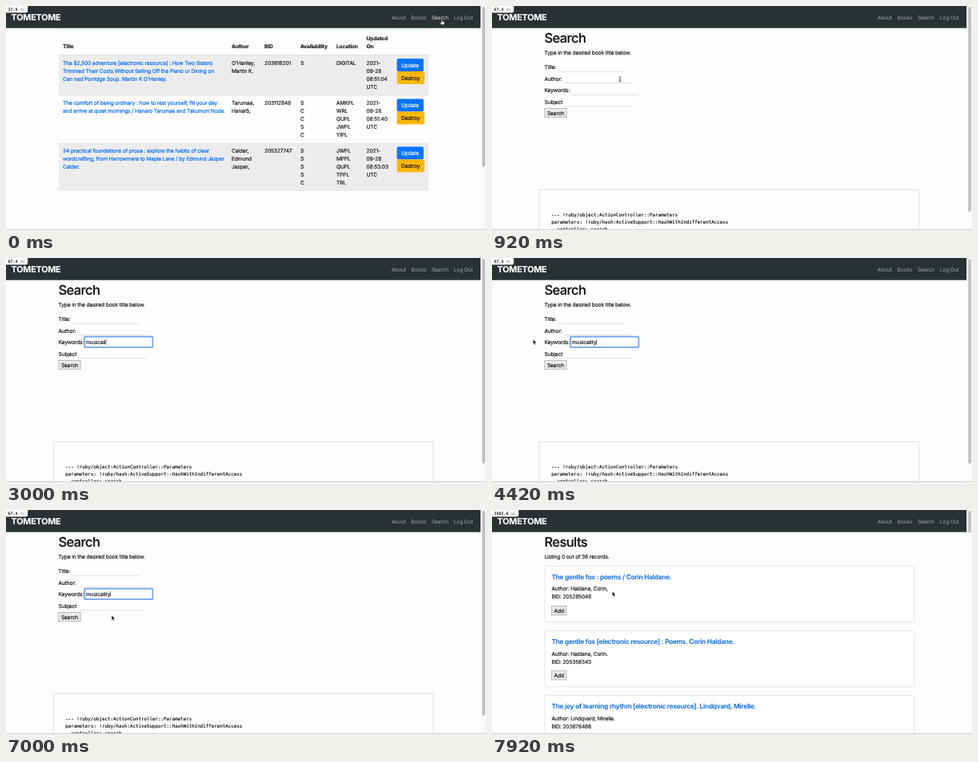
Animation of 600 by 281 pixels, one loop 8000 ms. Source, as an HTML page:

```html
<!DOCTYPE html>
<html lang="en">
<head>
<meta charset="utf-8">
<title>Book search</title>
<style>
  html, body { margin: 0; width: 100%; height: 100%; overflow: hidden; background: #fdfdfd; }
  svg { display: block; width: 100%; height: 100%; }
  text {
    font: 6.66px Inter, "Open Sans", sans-serif;
    letter-spacing: -.021em;
    color: #0c0e10;
    fill: currentColor;
    stroke: currentColor;
    stroke-width: .14px;
    white-space: pre;
    text-rendering: geometricPrecision;
  }
  .brand { font-size: 10.8px; font-weight: 700; letter-spacing: -.02em; color: #fff; }
  .nav { color: #959a9c; stroke-width: .06px; }
  .nav.hover { color: #c8cacb; }
  .h1 { font-size: 16.5px; font-weight: 500; letter-spacing: -.036em; }
  .th { font-weight: 700; letter-spacing: -.027em; stroke-width: .05px; }
  .link { color: #0a70ee; stroke-width: .2px; }
  .title { font-size: 8.32px; font-weight: 600; letter-spacing: -.027em; color: #0a6cdc; stroke-width: .05px; }
  .white { color: #fff; }
  .mono { font: 5.83px "DejaVu Sans Mono", monospace; letter-spacing: 0; }
  .badge { font: 5px "DejaVu Sans Mono", monospace; letter-spacing: 0; color: #888; stroke-width: 0; }
  .badge .num { font-weight: 700; fill: #222; }
</style>
</head>
<body>
<svg id="stage" viewBox="0 0 600 281" preserveAspectRatio="none" xmlns="http://www.w3.org/2000/svg"></svg>
<script>
const LOOP = 8000;
const stage = document.getElementById("stage");

function el(parent, tag, attrs = {}) {
  const node = document.createElementNS("http://www.w3.org/2000/svg", tag);
  for (const key in attrs) node.setAttribute(key, attrs[key]);
  parent.append(node);
  return node;
}
const group = parent => el(parent, "g");
const rect = (parent, x, y, width, height, fill, more = {}) =>
  el(parent, "rect", { x, y, width, height, fill, ...more });
function text(parent, x, y, content, cls = "") {
  const node = el(parent, "text", { x, y, class: cls });
  node.textContent = content;
  return node;
}
const lines = (parent, x, y, list, cls) =>
  list.forEach((line, i) => text(parent, x, y + i * 10, line, cls));
const show = (node, on) => node.setAttribute("display", on ? "inline" : "none");

function button(parent, x, y, w, label) {
  rect(parent, x + .3, y + .3, w - .6, 11.2, "#e9e9e9", { stroke: "#a5a5a5", "stroke-width": .7 });
  text(parent, x + 3.3, y + 8.4, label);
}

rect(stage, 0, 0, 600, 281, "#fdfdfd");

// Book list
function buildBooks() {
  const g = group(stage);
  const cols = [71, 282, 323, 368, 413, 450.5];
  const rows = [
    {
      y: 61.5, h: 50.5, fill: "#ececec",
      cells: [
        ["The $2,500 adventure [electronic resource] : How Two Sisters",
         "Trimmed Their Costs Without Selling Off the Piano or Dining on",
         "Can ned Porridge Soup. Martin K O'Hanley."],
        ["O'Hanley,", "Martin K."], ["203618201"], ["S"], ["DIGITAL"],
        ["2021-", "09-28", "08:51:04", "UTC"]
      ]
    },
    {
      y: 112, h: 60, fill: "#fdfdfd",
      cells: [
        ["The comfort of being ordinary : how to rest yourself, fill your day",
         "and arrive at quiet mornings / Hanaro Tarumae and Takumori Noda."],
        ["Tarumae,", "Hanarō,"], ["203112848"], [..."SCCSC"],
        ["AMKPL", "WRL", "QUPL", "JWPL", "YIPL"],
        ["2021-", "09-28", "08:51:40", "UTC"]
      ]
    },
    {
      y: 172, h: 60, fill: "#ececec",
      cells: [
        ["34 practical foundations of prose : explore the habits of clear",
         "wordcrafting, from Harrowmere to Maple Lane / by Edmund Jasper",
         "Calder."],
        ["Calder,", "Edmund", "Jasper,"], ["205327747"], [..."SSSSC"],
        ["JWPL", "MPPL", "QUPL", "TPPL", "TRL"],
        ["2021-", "09-28", "08:53:03", "UTC"]
      ]
    }
  ];
  rect(g, 66, 30, 462, .5, "#dedede");
  ["Title", "Author", "BID", "Availability", "Location"].forEach((name, i) =>
    text(g, cols[i], 53.3, name, "th"));
  lines(g, cols[5], 43.3, ["Updated", "On"], "th");
  for (const { y, h, fill, cells } of rows) {
    rect(g, 66, y, 462, h, fill);
    rect(g, 66, y, 462, .5, "#dcdfe2");
    cells.forEach((cell, i) => lines(g, cols[i], y + 12.3, cell, i ? "" : "link"));
    rect(g, 488.6, y + 4.5, 33.4, 16, "#0a74fa", { rx: 1.8 });
    text(g, 494, y + 15, "Update", "white");
    rect(g, 488.6, y + 20.5, 34.6, 16, "#ffb70a", { rx: 1.8 });
    text(g, 494, y + 31, "Destroy");
  }
  rect(g, 66, 61, 462, .8, "#dcdfe2");
  return g;
}

// Search form
const FIELD = { x: 98, y: 98.6, w: 85.4, h: 13.4 };
let ring, typed, caret;
function buildSearch() {
  const g = group(stage);
  text(g, 65.5, 46.4, "Search", "h1");
  text(g, 65.5, 60.8, "Type in the desired book title below.");
  [["Title:", 82], ["Author:", 89.5], ["Keywords:", 98.3], ["Subject", 90.3]].forEach(([label, x], i) => {
    const y = 79 + i * 14.55;
    text(g, 65.5, y, label);
    rect(g, x, y - 8, 84.5, 11, "#fff");
    rect(g, x, y + 2.8, 84.5, .6, "#cdcdcd");
  });
  button(g, 65.6, 128.2, 27.8, "Search");

  ring = group(g);
  rect(ring, FIELD.x, FIELD.y, FIELD.w, FIELD.h, "#fff",
    { rx: .8, stroke: "#b9d3f8", "stroke-width": 2 });
  rect(ring, FIELD.x + .2, FIELD.y + .2, FIELD.w - .4, FIELD.h - .4, "#fff",
    { rx: .6, stroke: "#5a92e8", "stroke-width": 1.2 });
  typed = text(ring, 99.9, 108.1, "");
  caret = rect(ring, 100, 101.6, .6, 7.6, "#222");

  rect(g, 59.2, 230.4, 474.8, 60, "#fdfdfd", { stroke: "#dcdcdc", "stroke-width": .8 });
  [
    "--- !ruby/object:ActionController::Parameters",
    "parameters: !ruby/hash:ActiveSupport::HashWithIndifferentAccess",
    "  controller: search"
  ].forEach((line, i) => text(g, 74.3, 264 + i * 8.8, line, "mono"));
  return g;
}

// Search results
function buildResults() {
  const g = group(stage);
  text(g, 65.5, 46.4, "Results", "h1");
  text(g, 65.5, 60.8, "Listing 0 out of 36 records.");
  [
    ["The gentle fox : poems / Corin Haldane.", "Haldane, Corin,", "205285048"],
    ["The gentle fox [electronic resource] : Poems. Corin Haldane.", "Haldane, Corin.", "205356343"],
    ["The joy of learning rhythm [electronic resource]. Lindqvard, Mirelle.", "Lindqvard, Mirelle.", "203676486"]
  ].forEach(([title, author, bid], i) => {
    const y = 70.2 + i * 81.2;
    rect(g, 65.9, y, 462, 70.5, "#fff", { rx: 1.7, stroke: "#dcdcdc", "stroke-width": .7 });
    text(g, 74.4, y + 16.5, title, "title");
    text(g, 74.4, y + 31.1, "Author: " + author);
    text(g, 74.4, y + 41.1, "BID: " + bid);
    button(g, 74.2, y + 50.1, 19, "Add");
  });
  return g;
}

const pages = [buildBooks(), buildSearch(), buildResults()];

// Navigation bar
rect(stage, 0, 0, 593.4, 27.7, "#293134");
text(stage, 6.6, 17.8, "TOMETOME", "brand");
const links = [["About", 481.8], ["Books", 506.5], ["Search", 531.9], ["Log Out", 559.7]]
  .map(([name, x]) => text(stage, x, 16.5, name, "nav"));

// Scroll bar and window edge
rect(stage, 593.4, 0, 6.6, 281, "#fafafa");
const thumb = rect(stage, 595.2, 1, 3.8, 100, "#c1c1c1", { rx: 1.9 });
rect(stage, 0, 280, 600, 1, "#d2d2d2");

// Timing badge
const badge = group(stage);
const badgeBox = rect(badge, -3, -3, 30, 11.2, "#fff", { rx: 2, stroke: "#c9c9c9", "stroke-width": .5 });
const badgeText = el(badge, "text", { x: 2.6, y: 6, class: "badge" });
const badgeNum = el(badgeText, "tspan", { class: "num" });
el(badgeText, "tspan").textContent = " ms";

// Pointer shapes, drawn around their hot spots
const pointer = group(stage);
const shapes = {
  arrow: el(pointer, "path", {
    d: "M0 0V6.2L1.4 4.9 2.4 7.2 3.4 6.8 2.4 4.5H4.3Z",
    fill: "#000", stroke: "#fff", "stroke-width": .5
  }),
  beam: el(pointer, "path", {
    d: "M-1.4 -3Q0 -3 0 -2.2Q0 -3 1.4 -3M0 -2.4V2.4M-1.4 3Q0 3 0 2.2Q0 3 1.4 3M-.7 .9H.7",
    fill: "none", stroke: "#222", "stroke-width": .7
  }),
  hand: el(pointer, "path", {
    d: "M-.9 -3.2Q-.2 -3.9 .5 -3.2V-.6L2.6 0Q3.4 .3 3.2 1.3L2.5 3.6H-.9L-2.9 .9Q-2.6 .1 -1.7 .6L-.9 1.3Z",
    fill: "#fff", stroke: "#111", "stroke-width": .6
  })
};

// time, x, y, shape
const MOVES = [
  [0, 545, 19.8, "hand"],
  [500, 470, 38, "arrow"], [590, 300, 62, "arrow"], [670, 235.5, 69, "arrow"],
  [840, 212, 77, "arrow"], [920, 160, 92, "beam"], [1000, 110, 106, "beam"],
  [1090, 86, 113, "arrow"], [1170, 80, 113.5, "arrow"], [1250, 95, 111, "arrow"],
  [1340, 121, 108, "beam"], [1420, 140, 107, "beam"], [1500, 150, 106.4, "beam"],
  [2250, 150, 106.4, ""],
  [3840, 150, 106.4, "beam"], [3920, 118, 106.4, "beam"], [4000, 74, 105, "arrow"],
  [4090, 51.4, 102, "arrow"],
  [4500, 54, 106, "arrow"], [4590, 60, 117, "arrow"], [4670, 69, 128, "arrow"],
  [4750, 76, 134, "arrow"], [4840, 79, 135.5, "arrow"],
  [5750, 78.5, 135, "arrow"], [5840, 78, 134, "arrow"], [5920, 77.5, 133.5, "arrow"],
  [6000, 77, 133, "arrow"],
  [6840, 84, 132.5, "arrow"], [6920, 106, 132, "arrow"], [7000, 132, 132, "arrow"],
  [7170, 139.8, 132, "arrow"]
];
// Final drift towards the first result
for (let i = 1; i <= 9; i++) {
  const p = i / 9, ease = p * p * (3 - 2 * p);
  MOVES.push([7170 + Math.round(i * 83.3), 139.8 + 10.6 * ease, 132 - 30 * ease, "arrow"]);
}
const BADGES = [[0, "37.9"], [90, ""], [170, "27.0"], [340, "67.4"], [7170, ""], [7250, "3492.6"]];
const PAGES = [[0, 0, 201], [90, 1, 257], [7170, 2, 28]];
const WORD = "musicality";
const KEYS = [2250, 2420, 2500, 2590, 2750, 2840, 2920, 3000, 3090, 3250];

const latest = (list, t) => list.findLast(step => step[0] <= t);

function draw(t) {
  const [, page, thumbHeight] = latest(PAGES, t);
  pages.forEach((g, i) => show(g, i === page));
  thumb.setAttribute("height", thumbHeight);
  links[2].classList.toggle("hover", t < 500);

  const value = latest(BADGES, t)[1];
  show(badge, value !== "");
  badgeNum.textContent = value;
  badgeBox.setAttribute("width", 9 + (value.length + 3) * 3.01);

  show(ring, t >= 1840);
  if (page === 1) {
    typed.textContent = WORD.slice(0, KEYS.filter(k => k <= t).length);
    caret.setAttribute("x", 100.1 + (typed.textContent ? typed.getComputedTextLength() : 0));
  }

  const [, x, y, shape] = latest(MOVES, t);
  pointer.setAttribute("transform", `translate(${x} ${y})`);
  for (const name in shapes) show(shapes[name], name === shape);
}

const start = performance.now();
function tick() {
  draw((performance.now() - start) % LOOP);
  requestAnimationFrame(tick);
}
tick();
</script>
</body>
</html>
```
